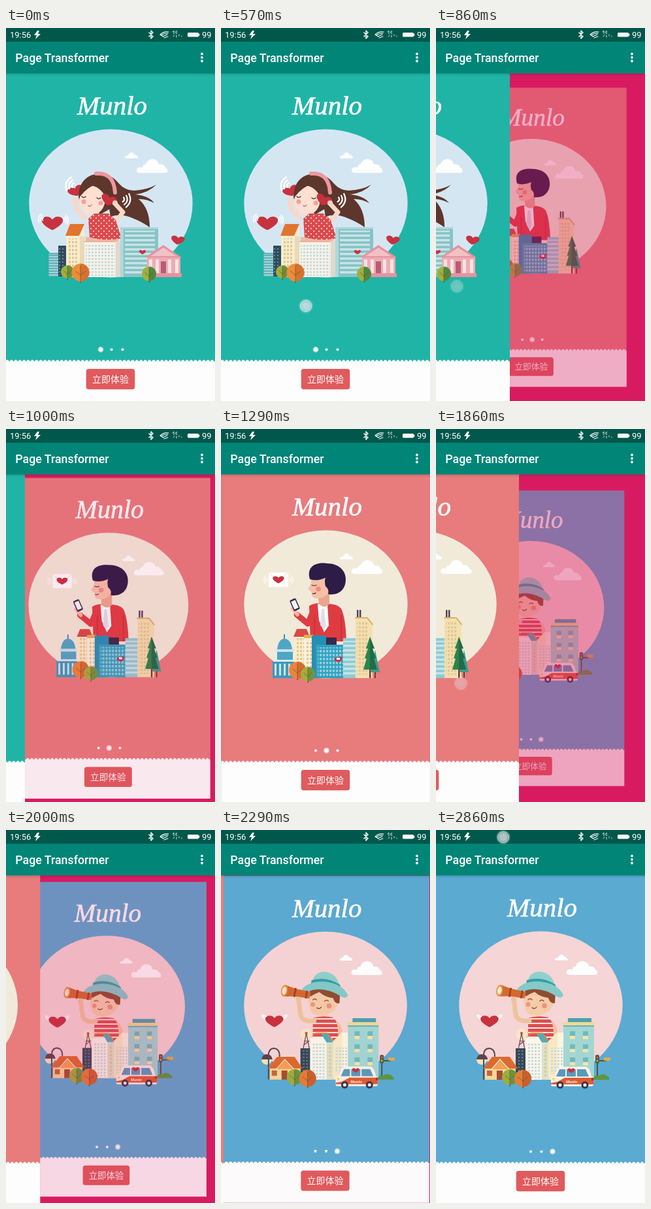
Recreate the animation shown at these times as an HTML page. Size 320x569 px, loop 3010 ms.

```html
<!DOCTYPE html>
<html lang="en">
<head>
<meta charset="utf-8">
<title>Page Transformer</title>
<style>
html, body { margin: 0; width: 100%; height: 100%; overflow: hidden; background: #d81b60; }
svg { display: block; width: 100%; height: 100%; }
text { fill: #fff; font-family: Roboto, sans-serif; }
.brand { font: italic 41px "Liberation Serif", serif; stroke: #fff; stroke-width: .7; }
.button { font: 14px "Noto Sans CJK SC", "Noto Sans CJK", sans-serif; text-anchor: middle; }
.van { font: italic bold 6px "Liberation Sans", sans-serif; }
.bar { font-size: 13px; }
.title { font-size: 17.8px; font-weight: 500; }
</style>
</head>
<body>
<svg id="stage" viewBox="0 0 320 569" preserveAspectRatio="none"></svg>
<script>
const rect = (x, y, w, h, fill, r = 0) => `<rect x="${x}" y="${y}" width="${w}" height="${h}" rx="${r}" fill="${fill}"/>`;
const oval = (x, y, rx, ry, fill) => `<ellipse cx="${x}" cy="${y}" rx="${rx}" ry="${ry}" fill="${fill}"/>`;
const disc = (x, y, r, fill) => oval(x, y, r, r, fill);
const shape = (d, fill) => `<path d="${d}" fill="${fill}"/>`;
const line = (d, color, width) =>
  `<path d="${d}" fill="none" stroke="${color}" stroke-width="${width}" stroke-linecap="round" stroke-linejoin="round"/>`;
const place = (x, y, scale, turn, art) => `<g transform="translate(${x} ${y}) rotate(${turn}) scale(${scale})">${art}</g>`;
const tile = (id, w, h, art) => `<pattern id="${id}" width="${w}" height="${h}" patternUnits="userSpaceOnUse">${art}</pattern>`;

const heart = (x, y, scale = 1, turn = 0, fill = "#c8323e") =>
  place(x, y, scale, turn, shape("M0 11C-26-2-17-11-9-11Q-3-11 0-6Q3-11 9-11C17-11 26-2 0 11Z", fill));
const waves = (x, y, scale, turn, color = "#fff") =>
  place(x, y, scale, turn, line("M3-3Q6 0 3 3M6-6Q11 0 6 6M9-9Q16 0 9 9", color, 2));
const cloud = (x, y, scale) =>
  place(x, y, scale, 0, shape("M4 21Q-2 20 1 14Q4 11 9 13Q9 8 14 8Q16 0 25 0Q33 1 34 8Q42 7 44 13Q49 15 47 20L44 21Z", "#fff"));
const ballTree = (x, y, r, light, dark) =>
  rect(x - .7, y, 1.4, r + 2, "#67492f") + disc(x, y, r, light) +
  shape(`M${x} ${y - r}A${r} ${r} 0 0 1 ${x} ${y + r}Z`, dark) +
  line(`M${x} ${y - r + 3}V${y + r - 1}M${x - r * .55} ${y - 2}L${x} ${y + 4}L${x + r * .55} ${y - 2}`, "#6a5232", .7);

const defs = `<defs>
  ${tile("dots", 8, 8, rect(0, 0, 8, 8, "#dc4a4e") + disc(2, 2, 1.1, "#fbe2dc") + disc(6, 6, 1.1, "#fbe2dc"))}
  ${tile("panes", 5, 5, rect(1, 1, 3, 2.6, "#c3d9dc"))}
  ${tile("lit", 5, 6, rect(1, 1, 3, 3.4, "#e0c794"))}
  ${tile("blue", 5, 6, rect(1, 1, 3.2, 3.8, "#8bd0de"))}
  ${tile("dark", 5, 5, rect(1, 1, 2, 2, "#6b8997"))}
  ${tile("floors", 40, 7, rect(0, 0, 40, 3.4, "#c9e4e4"))}
  ${tile("slats", 20, 4, rect(0, 0, 20, 1.6, "#b5dadc"))}
  ${tile("shirt", 40, 7, rect(0, 0, 40, 7, "#dd4f50") + rect(0, 0, 40, 2, "#fae8df"))}
  <linearGradient id="shade" x2="0" y2="1"><stop stop-opacity=".13"/><stop offset="1" stop-opacity="0"/></linearGradient>
</defs>`;

const girlCity = () =>
  shape("M150 224C174 226 170 247 196 248Q216 247 230 239Q219 251 198 254Q219 256 227 267Q214 260 203 261Q220 275 220 304Q207 295 196 291Q176 282 160 288Z", "#5d362c") +
  heart(107, 249, .7, -20) + waves(106, 241, 1.15, 200) +
  shape("M112 263C108 234 128 221 144 223C162 224 169 242 166 272L145 284Z", "#5d362c") +
  line("M121 290L108 277L105 262M170 293L179 281L167 268", "#fad7c6", 7) +
  shape("M112 262Q115 245 131 240Q152 246 152 264Q148 284 132 285Q114 284 112 262Z", "#fde0d1") +
  shape("M111 260Q112 230 141 223Q158 234 155 262Q149 248 135 240Q124 243 111 260Z", "#5d362c") +
  line("M116 257q3 3 6 0M139 259q3 3 6 0", "#4b2b2d", 1.2) +
  disc(119, 265, 3.5, "#f5a099") + disc(145, 267, 3.5, "#f5a099") + line("M126 271q3 2 5-1", "#c4524f", 1.2) +
  line("M138 222Q165 220 167 251", "#ef97a1", 6) +
  heart(157, 263, .72, 22) +
  disc(107, 264, 4, "#fad7c6") + disc(167, 267, 4, "#fad7c6") + waves(176, 261, 1.15, 12) +
  rect(122, 319, 50, 7, "#f0b9a0") +
  shape("M126 291L135 283L157 283L168 293L177 321Q150 326 128 319Z", "url(#dots)") +
  heart(71, 298, .94) + waves(59, 292, .75, 195) + waves(86, 293, .75, -5) +
  rect(65, 343, 16, 36, "#62b1ba") + rect(66, 345, 14, 34, "url(#slats)") +
  rect(80, 332, 13, 47, "#2f4c5f") + rect(81, 335, 10, 42, "url(#dark)") +
  shape("M92 317L99 299H120V380H92Z", "#f7ecce") + shape("M91 317L98 299H120L112 317Z", "#e2742f") +
  rect(94, 321, 16, 56, "url(#lit)") + rect(113, 318, 7, 62, "#e9d9b4") +
  rect(120, 325, 55, 55, "#f7f2e8") + rect(120, 325, 55, 1.5, "#e7a493") + rect(122, 330, 45, 48, "url(#panes)") + rect(168, 325, 7, 55, "#e0d9cc") +
  rect(175, 304, 58, 76, "#86c3c8") + rect(182, 309, 46, 68, "url(#floors)") + rect(175, 304, 5, 76, "#b0d8da") + rect(175, 304, 58, 3, "#a9d5d7") +
  rect(216, 350, 51, 30, "#e9adb5") + shape("M213 350L241 331L269 350Z", "#e6929f") + shape("M221 348L241 335L261 348Z", "#f3c0c5") +
  [219, 229, 248, 259].map(x => rect(x, 353, 5, 21, "#fbe1e2")).join("") + rect(237, 356, 8, 18, "#b95d72") +
  rect(214, 374, 55, 6, "#e6929f") + heart(263, 324, .6, 8) + heart(209, 342, .3) +
  ballTree(94, 372, 10, "#9db13f", "#6f8f37") + ballTree(114, 373, 13.5, "#ed8c39", "#d8712f") + ballTree(219, 375, 11, "#9db13f", "#4f8742");

const capitol = () =>
  line("M97 314V322", "#3c8fb4", 2) + shape("M86 336Q88 320 97 320Q107 320 109 336Z", "#4ea6c6") +
  rect(84, 336, 27, 4, "#c9e6ec") + rect(86, 340, 24, 14, "#4ea6c6") + rect(79, 354, 34, 26, "#3f98bd") +
  [82, 89, 96, 103].map(x => rect(x, 358, 3, 18, "#c9e6ec")).join("") + rect(80, 352, 33, 3, "#d9eef0");

const manCity = () =>
  shape("M135 270Q144 264 156 267Q177 265 184 274Q191 288 192 324H137Z", "#df3c42") +
  shape("M148 267L163 267L165 300L158 310L150 292Z", "#fff") + shape("M154 274L158 274L161 300L157 306L152 299Z", "#e1dfe8") +
  line("M142 276L133 297L116 283", "#df3c42", 9) + line("M117 283L110 274", "#f5baa2", 6) +
  place(113, 268, 1, -24, rect(-5, -9, 10, 18, "#352b4d", 2) + rect(-3.5, -6.5, 7, 13, "#f4f6fb")) +
  shape("M148 250H166V267Q158 275 150 267Z", "#eaa68f") +
  shape("M138 225H166V247Q159 260 144 258Q138 257 139 249L133 244L138 236Z", "#f6c0a8") +
  shape("M136 229C130 207 149 203 162 205C180 205 192 216 191 231C190 248 177 254 164 252Q166 244 160 240Q158 232 160 227Q146 233 136 229Z", "#2d1c46") +
  line("M139 238q4 2 7 0M140 251q3 1 5-1", "#512c43", 1.2) + disc(149, 244, 3.8, "#ee8b86") +
  line("M184 284V324M143 285V318", "#bb2935", 1) +
  rect(73, 219, 30, 22, "#fff", 1) + line("M74 220L88 232L102 220", "#dfdadb", 1) + heart(88, 230, .5) +
  waves(73, 230, .6, 180, "#fffaf2") + waves(103, 230, .6, 0, "#fffaf2") +
  capitol() +
  rect(112, 312, 22, 68, "#faedc8") + shape("M111 317L116 305H131L136 317Z", "#d84a43") + rect(114, 319, 18, 56, "url(#lit)") +
  rect(127, 318, 15, 62, "#f8f2dd") + rect(129, 322, 11, 54, "url(#lit)") + rect(127, 314, 15, 5, "#e6ad51") +
  rect(160, 318, 17, 14, "#392a4c") + rect(139, 315, 22, 65, "#258eb5") + rect(145, 329, 44, 51, "#319fbe") + rect(148, 333, 39, 44, "url(#blue)") +
  rect(187, 319, 21, 61, "#8dcbd5") + rect(187, 323, 21, 54, "url(#floors)") + heart(180, 352, .36, -15) + rect(177, 349, 5, 3, "#fff") +
  rect(208, 276, 2.5, 12, "#51435a") + rect(212, 276, 2.5, 12, "#51435a") +
  shape("M206 287H223L232 298V380H206Z", "#f4dfaf") + line("M206 288H224L232 298", "#d9ae68", 2) + rect(208, 295, 17, 80, "url(#lit)") +
  rect(227, 360, 2.5, 20, "#68402f") + rect(235, 365, 2, 15, "#68402f") +
  shape("M236 337L243 371H229Z", "#3d9a89") +
  shape("M228 317L235 335H232L237 350H234L239 367H218L223 350H220L225 335H222Z", "#2c854b") + shape("M228 317L235 335H232L237 350H234L239 367H228Z", "#216b48") +
  ballTree(117, 368, 13, "#ed8338", "#d66a31") + ballTree(133, 374, 11, "#a4ad3b", "#71943d");

const van = () =>
  shape("M180 379L185 365Q186 362 191 361H229Q236 362 238 377Z", "#fbf1e6") +
  shape("M184 376L189 365H198V376Z", "#5899bd") + rect(200, 365, 14, 11, "#5899bd", 1) + shape("M216 365H229L234 376H216Z", "#5899bd") +
  heart(207, 367, .32) + rect(176, 376, 65, 15, "#fbf1e6", 3) +
  shape("M176 386L186 384L197 378H241V388H176Z", "#df5b31") +
  `<text class="van" x="199" y="386">Munlo</text>` +
  disc(180, 380, 2, "#fbd36a") + rect(238, 378, 3, 4, "#b22d35") +
  [190, 228].map(x => disc(x, 389, 5.5, "#39334a") + disc(x, 389, 2.6, "#e9e8e9")).join("");

const boyCity = () =>
  line("M176 294Q185 303 183 317", "#f0c29d", 7) +
  shape("M141 287Q156 282 172 286Q181 291 180 322H141Z", "url(#shirt)") +
  line("M143 291Q124 293 122 281L119 257", "#f0c29d", 7) +
  shape("M134 246Q158 233 180 248Q184 262 174 275Q155 290 139 278Q133 267 134 246Z", "#f5cba8") +
  shape("M136 245Q159 235 183 248L182 264Q175 266 172 256Q160 255 151 247Q143 250 137 254Z", "#8f4d32") +
  line("M141 259q3-3 6 0M159 261q3-3 6 0M147 271q4 3 7-1", "#6b3a32", 1.2) + disc(141, 266, 3.4, "#ec9583") + disc(166, 268, 4, "#ec9583") +
  shape("M140 238Q140 217 158 216Q178 217 183 240Z", "#8fd1cd") + shape("M139 229Q162 222 183 236L184 243Q160 230 138 237Z", "#389da6") +
  shape("M124 243Q134 230 158 231Q187 234 195 252Q192 258 185 254Q156 236 132 247Q126 249 124 243Z", "#84cac9") +
  place(115, 248, 1, 10, shape("M-18-9L-2-6L22-5V5L-2 6L-18 9Z", "#d2692d") + rect(-3, -7, 3, 14, "#a44327") + rect(15, -6, 3, 12, "#a44327") + oval(-18, 0, 5, 9, "#e9954a") + oval(-18, 0, 3.2, 6, "#fbebd2")) +
  disc(119, 258, 4, "#f0c29d") +
  shape("M72 291Q62 289 62 281Q72 282 76 291ZM91 291Q102 289 102 281Q92 282 88 291Z", "#fff5f3") + heart(82, 292, .8) +
  disc(131, 312, 9, "#f6e5c7") + line("M131 310L126 335M131 310L136 335M128 322H134M127 328L135 322", "#644250", 1.2) + disc(131, 310, 2, "#d7443f") +
  rect(122, 333, 15, 48, "#374858") + rect(124, 336, 12, 42, "url(#dark)") +
  rect(137, 317, 34, 64, "#fbf6e8") + shape("M137 318L145 311H162L171 323V318L163 309H145Z", "#e8913e") + shape("M154 311H164L172 324H162Z", "#55aab8") +
  rect(140, 324, 20, 55, "url(#panes)") + rect(162, 324, 10, 57, "#d9e2cc") + rect(164, 328, 6, 48, "url(#lit)") +
  rect(172, 322, 24, 59, "#f8e9c4") + shape("M172 322L187 307V322Z", "#f8e9c4") + rect(186, 309, 12, 72, "#fbf4e0") + rect(174, 332, 20, 40, "url(#panes)") +
  rect(195, 295, 47, 86, "#a3d6d3") + rect(202, 287, 36, 7, "#4aa0b1") + rect(194, 293, 49, 5, "#f0d994") + rect(195, 298, 47, 2, "#68b2b9") +
  [307, 327, 347].map(y => [205, 225].map(x => rect(x, y, 8, 12, "#6fb9bf") + rect(x, y + 7, 8, 5, "#f6e3a4")).join("")).join("") +
  disc(70, 350, 8, "#f7e6b7") + line("M73 380V344Q73 333 82 333Q90 334 90 345", "#594451", 2) + shape("M62 350Q63 342 70 342Q78 342 79 350Z", "#594451") +
  rect(75, 362, 47, 19, "#f7d69a") + shape("M72 364L86 346H113L125 364Z", "#dd692f") + shape("M86 365L98 350L111 365Z", "#f2a053") +
  line("M85 365L98 350L112 365", "#fbe9cd", 1.2) +
  rect(78, 367, 8, 8, "#c0673c") + rect(93, 367, 9, 14, "#a74b32") + rect(108, 367, 8, 8, "#c0673c") +
  line("M247 378V350M247 352H260", "#4c563d", 2) + rect(244, 343, 6, 13, "#565940", 2) + rect(257, 347, 10, 5, "#e4aa45", 1) + disc(247, 347, 1.6, "#e45141") + disc(247, 352, 1.6, "#8ac468") +
  shape("M240 381Q242 373 249 375Q257 370 263 376Q267 378 265 381Z", "#5e963f") +
  ballTree(113, 377, 12, "#9eae3d", "#6b9440") + ballTree(133, 379, 13, "#e47d38", "#cb602f") + van();

const pages = [
  ["#20b4a6", "#d5e6f3", girlCity],
  ["#e87b7c", "#f2ead9", manCity],
  ["#5aaad2", "#f5d5d5", boyCity]
];

const page = ([back, sky, art], index) => `<g id="page${index}">
  ${rect(0, 69, 320, 500, back)}
  <text class="brand" x="109" y="132">Munlo</text>
  ${oval(160.5, 267.5, 125.2, 113, sky)}${cloud(200, 200, 1)}${cloud(182, 190, .42)}${art()}
  ${[145, 161.5, 178.5].map((x, i) => i === index ? disc(x, 490.5, 4.4, "#ffffff99") + disc(x, 490.5, 2.8, "#fff") : disc(x, 490.5, 2.1, "#fff")).join("")}
  ${rect(0, 508.5, 320, 61, "#fdfdfd")}
  <path d="M2 508.8H320" stroke="#fdfdfd" stroke-width="5" stroke-linecap="round" stroke-dasharray="0 6.4"/>
  ${rect(122.7, 520, 74.6, 31.3, "#e05b5d", 4)}<text class="button" x="160" y="541">立即体验</text>
</g>`;

const chrome = () =>
  rect(0, 69, 320, 5, "url(#shade)") + rect(0, 0, 320, 69.4, "#008577") + rect(0, 0, 320, 21, "#00574b") +
  `<text class="bar" x="6" y="15">19:56</text><text class="bar" x="300" y="15">99</text><text class="title" x="14.3" y="51.5">Page Transformer</text>` +
  shape("M48 4L43 11H47L45 17L53 9H49L51 4Z", "#fff") +
  line("M219 7L225 13L222 16V4L225 7L219 13", "#fff", 1.5) +
  line("M236 10Q241 5 249 6M237 11Q242 8 248 8M240 13L247 10M242 15L248 13M236 10L241 13", "#fff", 1.1) +
  line("M255 6L257 4V9M262 5H260V8H262M256 13L258 11M261 14V11M265 12V10M269 13V12", "#d7e6e3", 1) +
  rect(278, 7, 17, 6.5, "#fff", 1.5) + rect(295, 8.5, 1.3, 3.5, "#fff") +
  [39.5, 45, 50.5].map(y => disc(300, y, 1.9, "#fff")).join("");

const stage = document.getElementById("stage");
stage.innerHTML = defs + rect(0, 0, 320, 569, "#d81b60") +
  pages.map(page).reverse().join("") + chrome() +
  `<g id="touch">${disc(0, 0, 11, "#ffffff30")}${disc(0, 0, 9, "#e8e8ec80")}${disc(0, 0, 6, "#e2e0e570")}
    <circle r="8.6" fill="none" stroke="#ffffff80"/></g>`;

const layers = pages.map((_, i) => document.getElementById("page" + i));
const touch = document.getElementById("touch");
const touches = {
  4: [130, 424, 1], 5: [90, 412, 1], 6: [32, 394, .5],
  11: [144.5, 416, 1], 12: [106, 405, 1], 13: [38, 388, .5],
  20: [103, 11, 1]
};

// Distance of the incoming page's leading edge from the left.
function edge(time, start, dragged, release, span) {
  if (time < start) return 320;
  if (time < start + 150) return dragged;
  return release * Math.max(0, 1 - (time - start - 150) / span) ** 5;
}

const stepAt = time => Math.ceil((Math.floor(time / 10) + 1) * 3 / 43) - 1;

function draw(now) {
  const step = stepAt(now % 3010);
  const time = Math.floor(step * 43 / 3) * 10;
  const scroll = 2 - (edge(time, 710, 255, 113, 588) + edge(time, 1710, 275, 127, 860)) / 320;

  layers.forEach((layer, i) => {
    const position = i - scroll;
    const depth = Math.max(0, position);
    const scale = 1 - depth / 4;
    layer.style.display = Math.abs(position) < 1 ? "" : "none";
    layer.setAttribute("opacity", Math.max(0, 1 - depth));
    layer.setAttribute("transform", `translate(${Math.min(0, position) * 320} ${319 * (1 - scale)}) scale(${scale})`);
  });

  const [x, y, opacity] = touches[step] || [0, 0, 0];
  touch.setAttribute("transform", `translate(${x} ${y})`);
  touch.setAttribute("opacity", opacity);
}

const begin = performance.now();
function tick() {
  draw(performance.now() - begin);
  requestAnimationFrame(tick);
}
tick();
</script>
</body>
</html>
```
